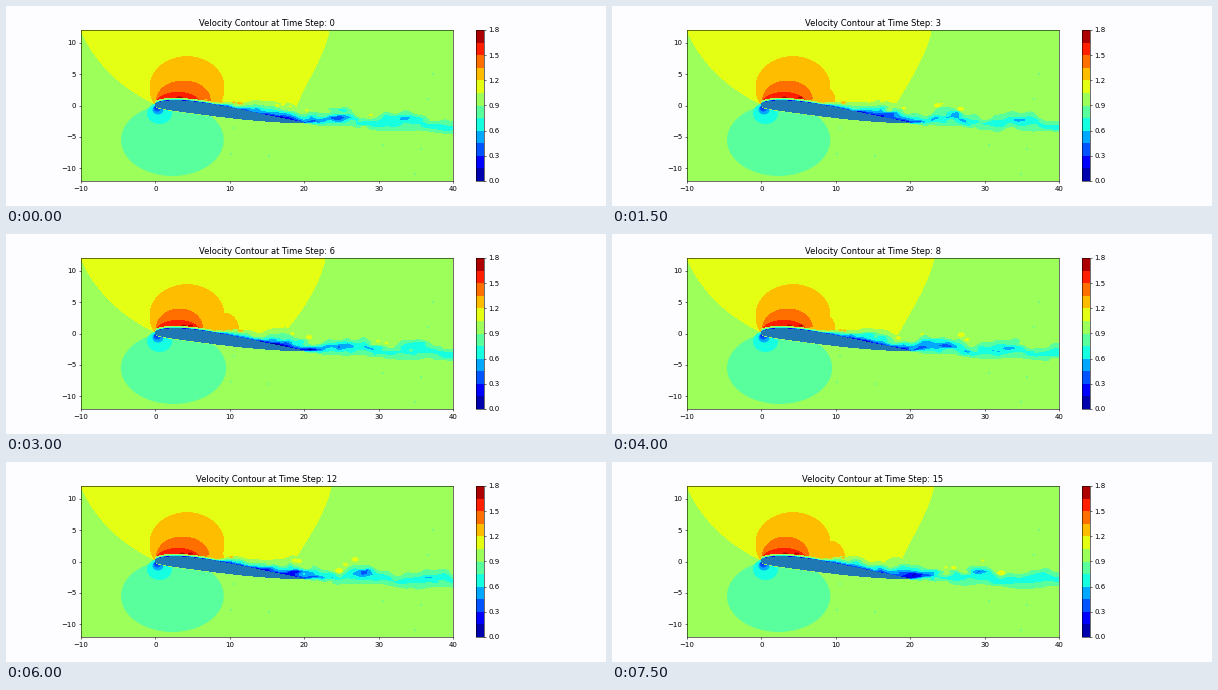
Write a matplotlib script that moves like this. It is 600 px wide and 200 px high and loops after 8000 ms.

```python
import matplotlib.pyplot as plt
import numpy as np
from matplotlib.animation import FuncAnimation
from matplotlib.patches import Ellipse

STEPS = 16
LEVELS = np.linspace(0, 1.8, 13)
BAND = [plt.cm.jet((i + 0.5) / 12) for i in range(12)]
NAVY, BLUE, SKY, CYAN, AQUA = BAND[1:6]
YELLOW, AMBER, ORANGE, RED, DARK = BAND[7:]
TAU = 2 * np.pi

# Shapes are laid out in stage pixels; the plot box is 372 by 151.
SCALE_X, SCALE_Y = 372 / 50, 151 / 24
NOSE, TAIL = (149, 99), (298, 117)
WAVE, DRIFT = 68, 25  # eddy spacing, and travel per step
SPECKS = [(427, 68), (422, 93), (228, 122), (225, 148), (263, 150),
          (377, 139), (415, 143), (409, 168)]


def to_data(x, y):
    return (np.asarray(x) - 75) / SCALE_X - 10, 12 - (np.asarray(y) - 24) / SCALE_Y


def foil(x):
    """Upper side, middle and lower side of a thin cambered wing section."""
    u = np.clip((np.asarray(x, float) - NOSE[0]) / (TAIL[0] - NOSE[0]), 0, 1)
    mid = NOSE[1] + (TAIL[1] - NOSE[1]) * u - 21 * u * (1 - u) ** 3
    half = 55 * (0.2969 * np.sqrt(u) - 0.126 * u - 0.3516 * u**2
                 + 0.2843 * u**3 - 0.1036 * u**4)
    return mid - half, mid, mid + half


fig, ax = plt.subplots(figsize=(12, 4), dpi=50, facecolor="#fdfcfe")
fig.subplots_adjust(left=0.125, right=0.9, bottom=0.125, top=0.88)
corner_x, corner_y = np.meshgrid([-10, 40], [-12, 12])
free = ax.contourf(corner_x, corner_y, np.full((2, 2), 0.97), levels=LEVELS,
                   cmap="jet", zorder=0.5)
fig.colorbar(free, ax=ax, ticks=LEVELS[::2], format="%.1f")
ax.set(xlim=(-10, 40), ylim=(-12, 12), xticks=range(-10, 41, 10), yticks=range(-10, 11, 5))
title = ax.set_title("")

gx = np.arange(149, 447.6, 0.5)
GX, GY = np.meshgrid(gx, np.arange(84, 136, 0.5))
DX, DY = to_data(GX, GY)
foil_top, _, foil_bottom = foil(gx)
on_foil = gx < TAIL[0]
core_speed = np.interp(gx, [298, 308, 324, 355], [0.05, 0.22, 0.56, 0.67])
power = np.interp(gx, [200, 230, 300, 350], [1.3, 0.5, 0.5, 1.3])
rough = np.interp(gx, [212, 240, 330, 400], [0, 0.13, 0.11, 0.05])
artists = []


def fill(points, color, z):
    x, y = to_data(*np.asarray(points, float).T)
    artists.extend(ax.fill(x, y, color=color, lw=0, zorder=z, antialiased=False))


def spot(x, y, w, h, color, z):
    e = Ellipse(to_data(x, y), w / SCALE_X, h / SCALE_Y, color=color, lw=0, zorder=z)
    artists.append(ax.add_patch(e))


def dome(x, y, rx, ry, color, z):
    """Ellipse cut off along the wing."""
    t = np.linspace(0, TAU, 120)
    px, py = x + rx * np.cos(t), y + ry * np.sin(t)
    fill(np.column_stack([px, np.minimum(py, foil(px)[1])]), color, z)


def draw_fast_side(k):
    sway = 3.3 * np.sin(TAU * (k - 8) / 14) - 0.5
    flap = 8 * np.cos(TAU * k / 3.7)
    pulse = np.cos(TAU * (k - 0.5) / 10)
    v = np.linspace(0, 1, 40)
    left = np.column_stack([75 + 74 * v ** (1.3 + 0.7 * v), 24 + 74 * v])
    right = np.column_stack([322 + sway - 43 * v**1.4 + flap * v**4, 24 + 82 * v])
    fill(np.vstack([left, [(215, 102), (245, 108)], right[::-1]]), YELLOW, 1)
    dome(181, 82, 37, 31.3, AMBER, 1.1)
    dome(207 - 10 * pulse, 95, 16, 16, AMBER, 1.1)
    dome(175.5 + 2 * pulse, 95, 25 + 2 * pulse, 20, ORANGE, 1.2)
    dome(172, 97, 21, 10.5, RED, 1.3)


def draw_slow_side(k):
    grow = 0.7 * np.cos(TAU * (k - 7) / 12)
    spot(167 + grow, 134, 104 + 2 * grow, 72, AQUA, 1.05)
    spot(153.5, 107.5, 25, 21, CYAN, 1.1)
    for i, color in enumerate((SKY, BLUE, NAVY)):
        size = 11 - 3.7 * i
        spot(152 - 0.7 * i, 103.8 - 1.4 * i, size, 0.85 * size, color, 1.2 + 0.1 * i)


def wake_edges(k, rng):
    phase = TAU * (gx - 330 - DRIFT * k) / WAVE
    ripple = sum(np.sin(TAU * gx / w + rng.uniform(0, TAU)) for w in (19, 31, 43))
    reach = np.interp(gx, [215, 260, 320], [0, 1.5, 4])
    line = np.interp(gx, [200, 225, 300, 447], [97.5, 97, 104, 110.5])
    up = np.minimum(foil_top - 2.2, line - reach * np.cos(phase) + 0.3 * reach * ripple)
    low = np.interp(gx, [298, 400, 447], [118.5, 126, 127])
    return up, low - 0.35 * reach * np.cos(phase - 1) * (gx > 310)


def wake_speed(k, up, low, rng):
    blend = np.clip((gx - TAIL[0]) / 32, 0, 1)
    mid = TAIL[1] * (1 - blend) + (up + low) / 2 * blend
    core_up = np.where(on_foil, foil_top - 0.7, mid)
    core_low = np.where(on_foil, foil_bottom + 0.6, mid)
    above = (core_up - GY) / np.maximum(core_up - up, 0.8)
    below = (GY - core_low) / np.maximum(low - core_low, 0.8)
    s = np.maximum(np.where(on_foil, above, np.maximum(above, below)), 0)
    speed = core_speed + (0.9 - core_speed) * s**power

    def bump(x, y, sx, sy):
        return np.exp(-((GX - x) / sx) ** 2 - ((GY - y) / sy) ** 2)

    noise = 0
    for _ in range(90):
        i = rng.integers(120, gx.size)
        y = up[i] + rng.random() * (low[i] - up[i])
        noise = noise + rng.choice([-1, 1]) * bump(gx[i], y, rng.uniform(3, 8),
                                                   rng.uniform(1.3, 2.8))
    speed += rough * noise
    first = 230 + (330 + DRIFT * k - 230) % WAVE
    for x in np.arange(first, 447, WAVE):
        y = np.interp(x, gx, (up + np.maximum(mid, up)) / 2) + rng.uniform(0, 5)
        depth = np.interp(x, [300, 440], [0.27, 0.12])
        speed -= depth * bump(x + rng.uniform(-6, 6), y, rng.uniform(6, 10), 3)
    speed = np.maximum(speed, 0.02)
    return np.where(on_foil & (GY > foil_bottom + 0.6), 2, speed)


def draw_wake(k):
    rng = np.random.default_rng(40 + k)
    up, low = wake_edges(k, rng)
    artists.append(ax.contourf(DX, DY, wake_speed(k, up, low, rng), levels=LEVELS[:8],
                               colors=BAND[:7], zorder=1.6))
    # fast spots riding on the shear layer
    for x in 270 + 120 * rng.random(5) ** 1.4:
        w = rng.uniform(3, 8)
        spot(x, np.interp(x, gx, up) - rng.uniform(1, 5), w, 0.65 * w, YELLOW, 1.7)
    for x in rng.uniform(198, 242, 5):
        spot(x, np.interp(x, gx, up) - 1.5, rng.uniform(3, 6), 2.2, AMBER, 1.7)
    for x in rng.uniform(172, 190, 2):
        spot(x, 91.5, 5, 1.8, DARK, 1.5)


def update(k):
    for a in artists:
        a.remove()
    artists.clear()
    title.set_text(f"Velocity Contour at Time Step: {k}")
    draw_fast_side(k)
    draw_slow_side(k)
    draw_wake(k)
    for x, y in SPECKS:
        spot(x, y, 2.4, 1.4, AQUA, 1.7)
    fill(np.vstack([np.column_stack([gx, foil_top])[on_foil],
                    np.column_stack([gx, foil_bottom])[on_foil][::-1]]), "C0", 1.9)
    return artists


anim = FuncAnimation(fig, update, frames=STEPS, interval=500, repeat=True,
                     repeat_delay=0, init_func=lambda: [], blit=False)
plt.show()
```
